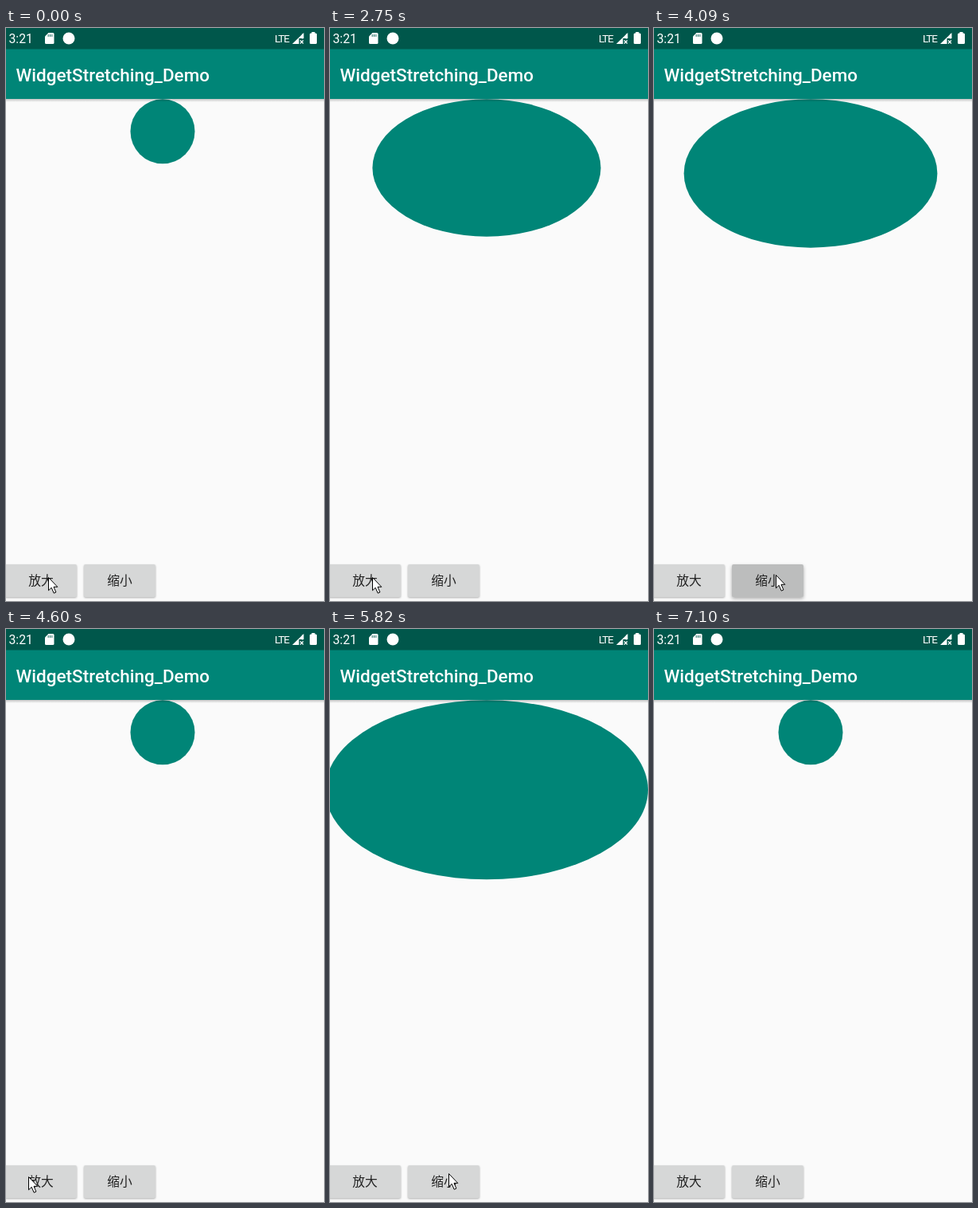
Animation of 400 by 719 pixels, one loop 7530 ms. Source, as an HTML page:

```html
<!DOCTYPE html>
<html lang="zh-CN">
<head>
<meta charset="utf-8">
<title>Demo</title>
<style>
  html, body { margin: 0; width: 100%; height: 100%; overflow: hidden; background: #fafafa; }
  svg { display: block; width: 100%; height: 100%; }
  text { font-family: Roboto, "Noto Sans", sans-serif; fill: #fff; }
  .title { font-size: 22.5px; font-weight: 500; }
  .clock { font-size: 15.75px; }
  .net { font-size: 13.5px; letter-spacing: -1.1px; }
  .btn rect { fill: #d6d7d7; filter: drop-shadow(0 1px 1px rgba(0, 0, 0, .3)); }
  .btn.down rect { fill: #bcbdbd; filter: drop-shadow(0 2px 2px rgba(0, 0, 0, .32)); }
  .btn text { font: 15.75px "Noto Sans CJK SC", "Noto Sans CJK", sans-serif; fill: #222; text-anchor: middle; }
</style>
</head>
<body>
<svg viewBox="0 0 400 719" preserveAspectRatio="none">
  <defs>
    <linearGradient id="shade" x2="0" y2="1">
      <stop offset="0" stop-opacity=".22"/>
      <stop offset="1" stop-opacity="0"/>
    </linearGradient>
  </defs>
  <rect width="400" height="719" fill="#fafafa"/>
  <ellipse id="badge" cx="197" fill="#008577"/>

  <rect y="89" width="400" height="4" fill="url(#shade)"/>
  <rect y="26" width="400" height="63" fill="#008577"/>
  <rect width="400" height="26.5" fill="#00574b"/>
  <text class="title" x="12.5" y="67">WidgetStretching_Demo</text>

  <text class="clock" x="3.5" y="19">3:21</text>
  <g fill="#fff">
    <path d="M53.5 6h5.5q1.5 0 1.5 1.5v11q0 1.5-1.5 1.5h-8.500q-1.500 0-1.500-1.500v-8z"/>
    <circle cx="79" cy="13" r="7.5"/>
    <path d="M374.500 6v7h-6v7h-8.500z"/>
    <path d="M373 7.500v6" stroke="#fff" stroke-width="1.500"/>
    <path d="M384.500 6.500v-1.500h4v1.500h1q1.500 0 1.500 1.500v10.500q0 1.500-1.500 1.500h-6q-1.500 0-1.500-1.500v-10.500q0-1.500 1.500-1.500z"/>
  </g>
  <path d="M53.200 8v3M55.500 8v3M57.800 8v3" stroke="#00574b" stroke-width=".9"/>
  <path d="M370 15.500l4 4m0-4l-4 4" stroke="#fff" stroke-width="1.200"/>
  <text class="net" x="338" y="18">LTE</text>

  <g class="btn" id="grow">
    <rect x="-2" y="673" width="91" height="41" rx="2"/>
    <text x="44" y="698.500">放大</text>
  </g>
  <g class="btn" id="shrink">
    <rect x="98" y="673" width="90" height="41" rx="2"/>
    <text x="143" y="698.500">缩小</text>
  </g>

  <path id="mouse" d="M.5 .5v16.300l3.700-3.500 3 6.900 2.700-1.200-2.900-6.700h4.800z" fill="#fff" stroke="#000"/>
</svg>
<script>
  const $ = id => document.getElementById(id);
  const LOOP = 7530, ZOOM = 300;

  // Screen updates: time, pointer x, pointer y (no position: pointer hidden)
  const steps = [
    [0, 53, 689], [990], [1550, 53, 691], [2230, 53, 689],
    [2480, 53, 689], [2630, 53, 689], [2750, 53, 689], [2900, 53, 689],
    [3020, 82, 688], [3140, 126, 686], [3260, 153, 686],
    [3970, 153, 686], [4090, 153, 686], [4240, 153, 686],
    [4360, 118, 686], [4480, 66, 687], [4600, 28, 687], [4880, 41, 687],
    [5160, 41, 687], [5280, 41, 687], [5400, 41, 687],
    [5550, 88, 673], [5670, 136, 658], [5820, 149, 683],
    [6470, 149, 683], [6590, 149, 683], [6740, 149, 683],
    [6860, 149, 688], [6980, 150, 704], [7100]
  ];

  // Start of each zoom and its direction
  const zooms = [[2574, 1], [3986, -1], [5207, 1], [6555, -1]];
  const presses = {
    grow: [[2480, 2750], [5160, 5400]],
    shrink: [[3970, 4240], [6470, 6740]]
  };

  const ease = u => (1 - Math.cos(Math.PI * Math.min(1, Math.max(0, u)))) / 2;
  const zoomAt = t => zooms.reduce((p, [start, dir]) => p + dir * ease((t - start) / ZOOM), 0);

  function draw(now) {
    const time = now % LOOP;
    const [t, x, y] = steps.findLast(s => s[0] <= time);
    const p = zoomAt(t);
    const rx = 40.5 + 162.5 * p, ry = 40.5 + 72 * p;
    $('badge').setAttribute('rx', rx);
    $('badge').setAttribute('ry', ry);
    $('badge').setAttribute('cy', 89.3 + ry);

    for (const id in presses)
      $(id).classList.toggle('down', presses[id].some(([a, b]) => t >= a && t < b));

    const shown = x !== undefined;
    $('mouse').style.visibility = shown ? 'visible' : 'hidden';
    if (shown) $('mouse').setAttribute('transform', `translate(${x} ${y})`);
  }

  function tick() {
    draw(performance.now());
    requestAnimationFrame(tick);
  }
  tick();
</script>
</body>
</html>
```
